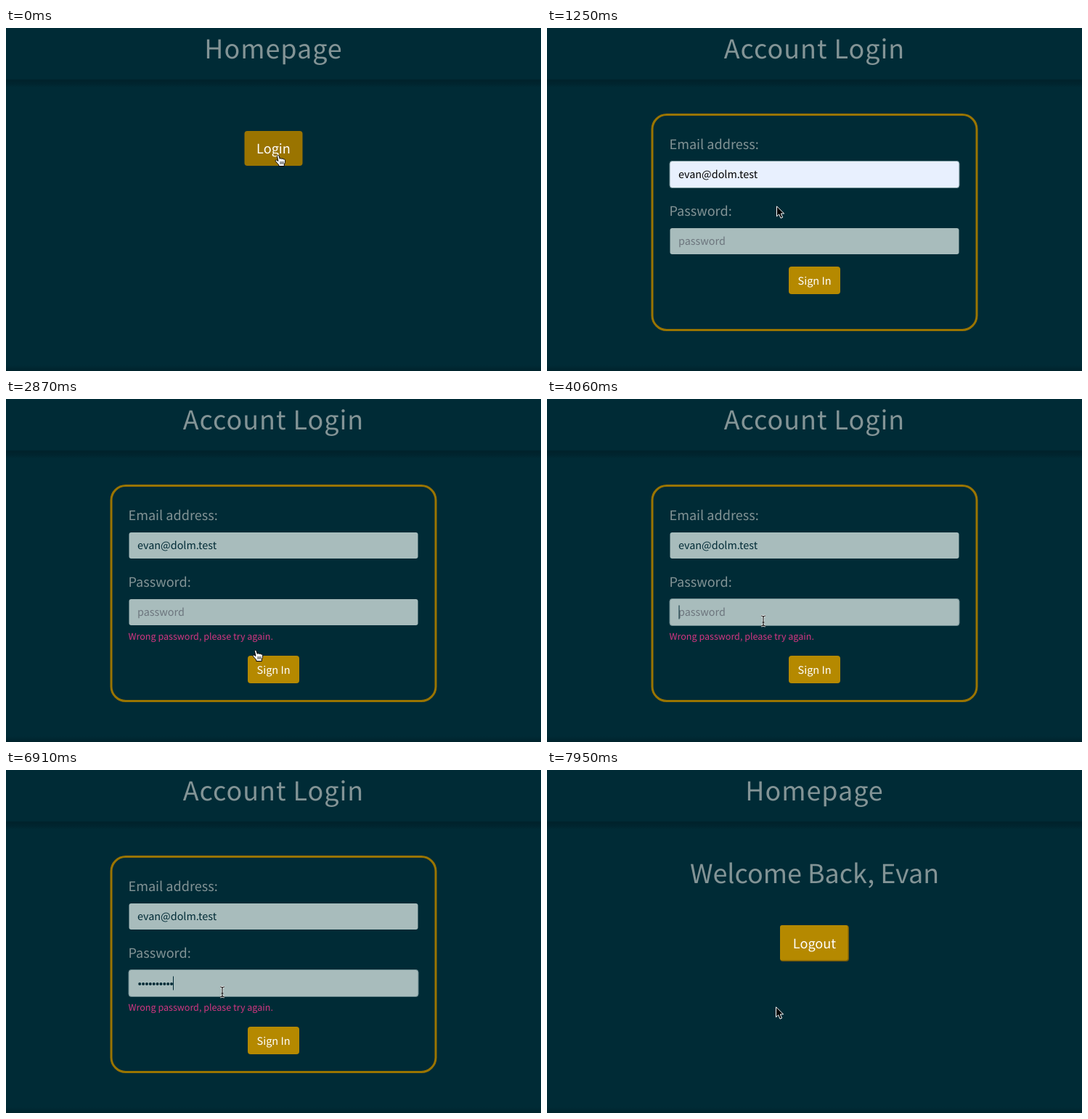
An HTML page for the animation above (8 s loop, 737x473 px).

```html
<!DOCTYPE html>
<html lang="en">
<head>
<meta charset="utf-8">
<title>Login flow</title>
<style>
html, body { margin: 0; width: 100%; height: 100%; overflow: hidden; background: #002b36; }
svg { display: block; width: 737px; height: 473px; }
text {
  font-family: "Noto Sans CJK SC", "Noto Sans CJK JP", "Noto Sans CJK KR", "Noto Sans", sans-serif;
  text-rendering: geometricPrecision;
  white-space: pre;
}
</style>
</head>
<body>
<svg viewBox="0 0 737 473">
  <defs>
    <linearGradient id="top" x2="0" y2="1">
      <stop offset="0" stop-color="#00222b" stop-opacity="0"/>
      <stop offset=".15" stop-color="#00222b"/>
      <stop offset=".6" stop-color="#00252f"/>
      <stop offset="1" stop-color="#00252f" stop-opacity="0"/>
    </linearGradient>
    <linearGradient id="foot" x2="0" y2="1">
      <stop offset="0" stop-color="#00232c" stop-opacity="0"/>
      <stop offset="1" stop-color="#00232c"/>
    </linearGradient>
  </defs>
  <rect width="737" height="473" fill="#002b36"/>
  <rect y="70" width="737" height="12" fill="url(#top)"/>
  <rect y="465" width="737" height="8" fill="url(#foot)"/>
  <g id="view"></g>
</svg>
<script>
const LOOP = 8000, MID = 368.5;
const BASE = '#002b36', GREY = '#839496', GOLD = '#b58900', DARK_GOLD = '#9a7400';
const FIELD = '#a8bcbc', AUTOFILL = '#e8f0fe', HINT = '#6c757d', PINK = '#d33682';

// Each step changes part of the state and holds until the next one.
const steps = [
  [0, { page: 'home', cursor: ['hand', 376, 175] }],
  [500, { page: 'login', cursor: ['arrow', 374, 172], fresh: 1, button: '#e6dfc9', label: '#30383c',
          email: 0, emailFill: FIELD, focus: '', dots: 0, caret: 0, error: 0 }],
  [650, { button: '#d8c58c', label: '#5c6568' }],
  [800, { fresh: 0, button: GOLD, label: '#fff' }],
  [1100, { cursor: ['beam', 336, 203], focus: 'email' }],
  [1250, { cursor: ['arrow', 316, 245], email: 1, emailFill: AUTOFILL }],
  [1390, { cursor: ['beam', 301, 294] }],
  [1690, { focus: 'password' }],
  [1840, { caret: 1 }],
  [2140, { dots: 2 }],
  [2430, { dots: 4 }],
  [2580, { dots: 6, cursor: ['hand', 345, 346], button: DARK_GOLD }],
  [2730, { focus: '' , caret: 0 }],
  [2870, { emailFill: FIELD, dots: 0, error: 1, button: GOLD }],
  [3460, { cursor: ['hand', 340, 357], button: DARK_GOLD }],
  [3610, { cursor: ['arrow', 312, 322], button: GOLD }],
  [3760, { cursor: ['beam', 298, 306] }],
  [4060, { focus: 'password', caret: 1 }],
  [4360, { caret: 0 }],
  [4660, { dots: 1, caret: 1 }],
  [4960, { dots: 2 }],
  [5410, { dots: 3 }],
  [5860, { dots: 4 }],
  [6160, { dots: 5 }],
  [6310, { dots: 6 }],
  [6460, { dots: 7 }],
  [6760, { dots: 9 }],
  [6910, { dots: 10 }],
  [7350, { page: 'welcome' }],
  [7950, { cursor: ['arrow', 315, 326] }]
];

const text = (str, x, y, size, fill, more = '') =>
  `<text x="${x}" y="${y}" font-size="${size}" fill="${fill}" ${more}>${str}</text>`;
const centred = (str, y, size, fill, more = '') =>
  text(str, MID, y, size, fill, 'text-anchor="middle" ' + more);
const rect = (x, y, w, h, fill, r = 4, more = '') =>
  `<rect x="${x}" y="${y}" width="${w}" height="${h}" rx="${r}" fill="${fill}" ${more}/>`;
const title = str => centred(str, 42, 35.9, GREY, 'letter-spacing="1"');

const cursors = {
  arrow: `<path d="M.5 .8V14.8L3.7 11.8L6 17.2L8.6 16.1L6.3 10.9H10.6Z"
    fill="#000" stroke="#fff" stroke-linejoin="round"/>`,
  hand: `<path d="M-2.5 1.6C-2.5 .2 -.5 .1 0 1.5L1.3 5.4C1.7 4.3 3.4 4.4 3.8 5.6C4.4 4.7 6 4.9 6.3 6.1
    C7.3 5.5 8.6 6.2 8.6 7.6C8.7 10 8.3 11.4 7.3 13V15.5H-.2V13.8C-2 12 -3 10.5 -4.6 8.8
    C-5.4 7.8 -4 6.5 -2.7 7.4L-1.1 8.6Z" fill="#fff" stroke="#000" stroke-linejoin="round"/>
    <path d="M2 9V13M4 9V13M6 9V13" stroke="#000" stroke-width=".8"/>`,
  beam: ['#fff" stroke-width="2.6', '#000" stroke-width="1.1'].map(stroke =>
    `<path d="M-3 -7Q-.5 -7 0 -5.5Q.5 -7 3 -7M0 -5.5V5.5M-3 7Q-.5 7 0 5.5Q.5 7 3 7M-1.5 2H1.5"
    fill="none" stroke="${stroke}"/>`).join('')
};

function field(y, fill, bordered) {
  return bordered
    ? rect(169, y + .5, 399, 37, fill, 3.5, 'stroke="#6d8b90"')
    : rect(169.5, y + 1, 398, 36, fill, 3);
}

function password(s) {
  if (!s.dots) {
    return text('password', 181, 299, 14.4, HINT) +
      (s.caret ? rect(181.5, 284.5, 1, 19, BASE, 0) : '');
  }
  let out = '';
  for (let i = 0; i < s.dots; i++) {
    out += `<circle cx="${184.2 + i * 4.87}" cy="295" r="2" fill="${BASE}"/>`;
  }
  return out + (s.caret ? rect(181.3 + s.dots * 4.87, 284.5, 1, 19, BASE, 0) : '');
}

const pages = {
  home: () => title('Homepage') +
    rect(328.5, 142, 80, 48, DARK_GOLD) +
    centred('Login', 173, 18.1, '#fff'),

  login(s) {
    const y = s.error ? 354 : 329;
    return title('Account Login') +
      rect(145, 119.5, 447, 297, 'none', 20, `stroke="${DARK_GOLD}" stroke-width="3"`) +
      text('Email address:', 168.5, 167, 18.1, GREY) +
      field(183, s.emailFill, s.fresh || s.focus === 'email') +
      text(s.email ? 'evan@dolm.test' : 'email', 181, 207, 14.4,
        !s.email ? HINT : s.emailFill === AUTOFILL ? '#000' : BASE) +
      text('Password:', 168.5, 259, 18.1, GREY) +
      field(275, FIELD, s.fresh || s.focus === 'password') +
      password(s) +
      (s.error ? text('Wrong password, please try again.', 168.5, 332, 12.55, PINK) : '') +
      rect(333, y, 71, 38, s.button, 4) +
      (s.fresh ? rect(333.5, y + .5, 70, 37, 'none', 3.5, 'stroke="#a48a45" stroke-opacity=".7"') : '') +
      centred('Sign In', y + 24.5, 14.5, s.label);
  },

  welcome: () => title('Homepage') +
    centred('Welcome Back, Evan', 156, 35.9, GREY) +
    rect(321, 214, 95, 50, '#765a0a') +
    rect(321, 214, 93.5, 48.5, GOLD, 3) +
    centred('Logout', 246, 18.1, '#fff')
};

const view = document.getElementById('view');
let shown = 0;

function draw(now) {
  const t = now % LOOP;
  const past = steps.filter(([start]) => start <= t);
  if (past.length !== shown) {
    shown = past.length;
    const s = Object.assign({}, ...past.map(step => step[1]));
    const [kind, x, y] = s.cursor;
    view.innerHTML = pages[s.page](s) +
      `<g transform="translate(${x} ${y})">${cursors[kind]}</g>`;
  }
  requestAnimationFrame(() => draw(performance.now() - began));
}

const began = performance.now();
draw(0);
</script>
</body>
</html>
```
